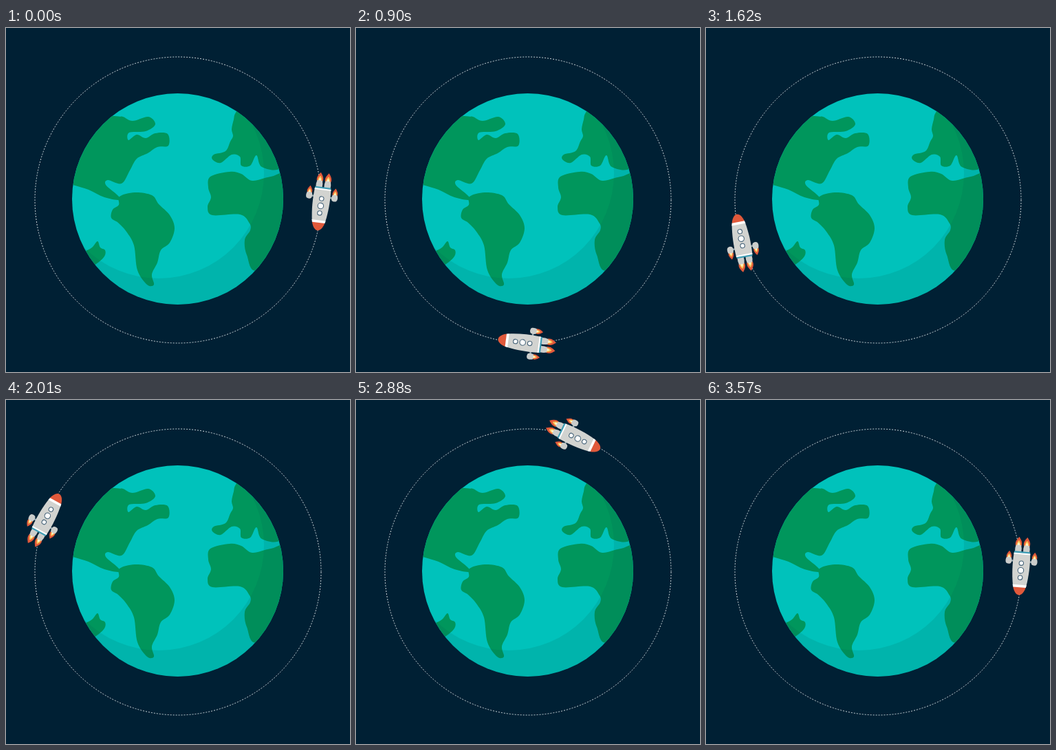
Write an HTML page with a canvas that moves like this. It is 500x500 px and loops after 3.6 s.

```html
<!DOCTYPE html>
<html lang="en">
<head>
<meta charset="utf-8">
<title>Rocket in orbit</title>
<style>
html, body { margin: 0; width: 100%; height: 100%; overflow: hidden; background: #002034; }
canvas { display: block; width: 500px; height: 500px; }
</style>
</head>
<body>
<canvas id="stage" width="500" height="500"></canvas>
<script>
const ctx = document.getElementById('stage').getContext('2d');
const LOOP = 3600, STEP = 30, TAU = Math.PI * 2, DEG = Math.PI / 180;
const EARTH = { x: 249.5, y: 248.5, r: 153.5 };
const ORBIT = { x: 250, y: 250, r: 208 };

// Closed smooth curve through a few key points "x,y x,y ...".
function coast(text) {
  const points = text.split(' ').map(pair => pair.split(',').map(Number));
  const path = new Path2D();
  const at = i => points[(i + points.length) % points.length];
  path.moveTo(...at(0));
  points.forEach((b, i) => {
    const a = at(i - 1), c = at(i + 1), d = at(i + 2);
    path.bezierCurveTo(
      b[0] + (c[0] - a[0]) / 6, b[1] + (c[1] - a[1]) / 6,
      c[0] - (d[0] - b[0]) / 6, c[1] - (d[1] - b[1]) / 6, c[0], c[1]);
  });
  return path;
}

function disc(x, y, r) {
  const path = new Path2D();
  path.arc(x, y, r, 0, TAU);
  return path;
}

function fill(color, path, rule = 'nonzero') {
  ctx.fillStyle = color;
  ctx.fill(typeof path === 'string' ? new Path2D(path) : path, rule);
}

const lands = {
  northAmerica: '85,120 158,128 170,129 184,135 207,129 217,140 203,150 179,152 178,163 190,155 203,160 '
    + '217,153 235,154 236,171 220,173 206,182 190,190 180,207 168,226 148,221 145,228 161,242 '
    + '166,250 143,246 120,235 97,228 80,222',
  southAmerica: '165,245 187,239 212,243 222,256 238,272 245,291 238,312 225,323 220,341 212,358 '
    + '215,373 205,373 191,352 186,316 175,296 163,283 153,276 155,264 164,257',
  island: '110,330 125,319 133,310 137,319 144,323 143,332 131,343 115,350',
  europe: '350,105 334,123 331,133 328,147 330,157 326,165 319,179 302,184 300,191 312,196 328,184 '
    + '340,187 342,200 355,200 364,185 372,202 400,203 420,160',
  africa: '420,213 385,216 358,222 342,212 325,209 297,216 294,232 298,246 293,260 300,272 340,271 '
    + '354,284 355,294 347,308 350,330 366,352 425,300'
};
const coasts = Object.values(lands).map(coast);
const globe = disc(EARTH.x, EARTH.y, EARTH.r);
const shade = new Path2D('M0 0H500V500H0Z');
shade.addPath(disc(222, 211, 153));

function drawScene() {
  fill('#002034', 'M0 0H500V500H0Z');

  ctx.strokeStyle = '#d0d7db';
  ctx.lineWidth = 1;
  ctx.setLineDash([2, 2]);
  ctx.stroke(disc(ORBIT.x, ORBIT.y, ORBIT.r));
  ctx.setLineDash([]);

  fill('#00c2bb', globe);
  ctx.save();
  ctx.clip(globe);
  coasts.forEach(land => fill('#00965c', land));
  fill('rgba(0,90,80,0.135)', shade, 'evenodd');
  ctx.restore();
}

// Flame of the given size behind a nozzle; the flame's base is the origin.
function engine(x, y, size, nozzle) {
  ctx.save();
  ctx.translate(x, y);
  ctx.save();
  ctx.scale(size, size);
  fill('#e2593b', 'M-4.2 1C-6 -4 -3 -8 0 -12C3 -8 6 -4 4.2 1Z');
  fill('#fbc454', 'M-2.8 1C-3.6 -2 -1.8 -5 0 -7C1.8 -5 3.6 -2 2.8 1Z');
  fill('#fff3d0', 'M-1.7 1C-2 -1 -1 -3 0 -4C1 -3 2 -1 1.7 1Z');
  ctx.restore();
  fill('#cbcdcb', nozzle);
  ctx.restore();
}

// Local axes: origin at the middle window, nose towards +y.
function drawRocket() {
  fill('#8fa3ad', 'M-18 -14.5H18V-12H-18Z');
  for (const side of [-1, 1]) {
    engine(side * 6, -36.5, 1, 'M-3.8 0H3.8Q5.4 5 4.6 10H-4.6Q-5.4 5 -3.8 0Z');
    engine(side * 18.6, -18, 0.8, 'M-3.4 0H3.4C5 3 5 8 2.5 9Q0 10 -2.5 9C-5 8 -5 3 -3.4 0Z');
  }
  fill('#d2d3d0', 'M-11.8 -25H11.8C13.2 -8 12.2 8 9.8 22H-9.8C-12.2 8 -13.2 -8 -11.8 -25Z');
  fill('#3c9db5', 'M-11.5 -27.5H11.5L11.8 -25H-11.8Z');
  fill('#ffffff', 'M-11.8 -25.3H11.8L12 -23.2H-12Z');
  fill('#e0593b', 'M-9.4 24C-8 30 -4.5 36 0 36C4.5 36 8 30 9.4 24Z');
  fill('#ffffff', 'M-10.2 21H10.2L9.3 24.6H-9.3Z');

  ctx.strokeStyle = '#48657a';
  ctx.lineWidth = 1.1;
  for (const row of [-1, 0, 1]) {
    const pane = disc(0, row * 10.5, row ? 3.2 : 4.2);
    fill('#ffffff', pane);
    ctx.stroke(pane);
  }
}

function frame(now) {
  const time = Math.floor(now % LOOP / STEP) * STEP;
  drawScene();
  ctx.save();
  ctx.translate(ORBIT.x + 0.5, ORBIT.y + 0.2);
  ctx.rotate(time / LOOP * TAU + 2.3 * DEG);
  ctx.translate(ORBIT.r - 1, 0);
  ctx.rotate(5.3 * DEG);
  drawRocket();
  ctx.restore();
}

const start = performance.now();
function tick() {
  frame(performance.now() - start);
  requestAnimationFrame(tick);
}
tick();
</script>
</body>
</html>
```
